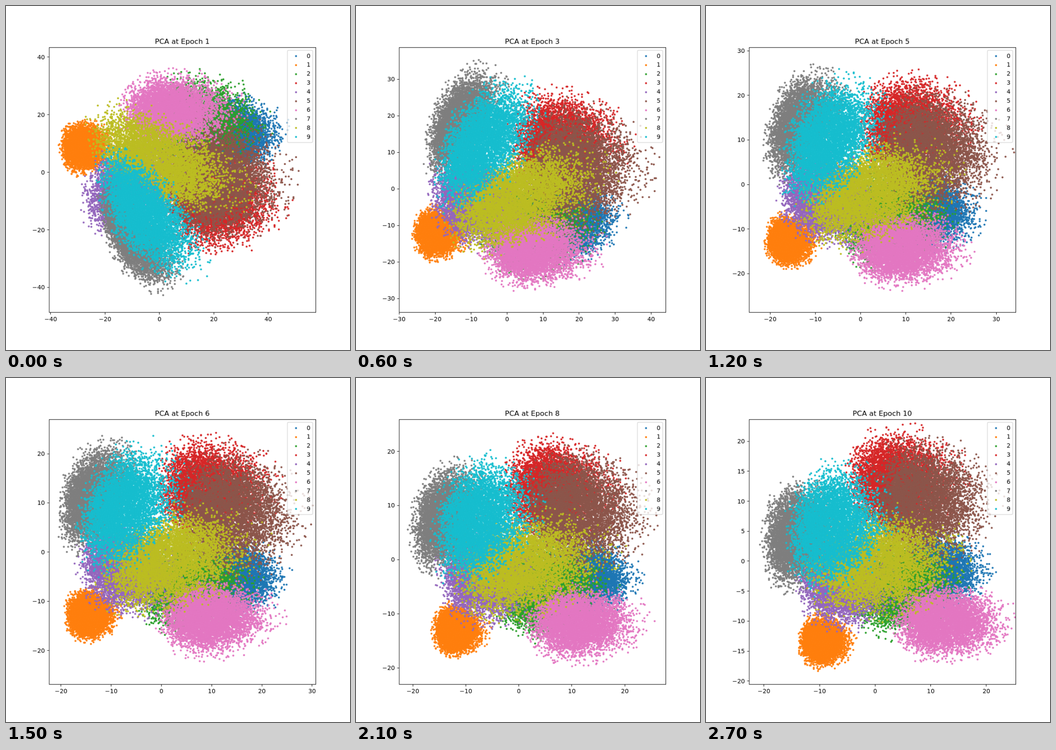
These frames come from a looping animation (748x748 px, 3000 ms). An HTML page with a canvas:

```html
<!DOCTYPE html>
<html lang="en">
<head>
<meta charset="utf-8">
<title>PCA by epoch</title>
<style>
  html, body { margin: 0; width: 100%; height: 100%; overflow: hidden; background: #fff; }
  canvas { display: block; width: 100%; height: 100%; }
</style>
</head>
<body>
<canvas id="plot" width="800" height="800"></canvas>
<script>
const SIZE = 800, UNIT = 748 / SIZE;      // canvas size, stage pixels per canvas pixel
const LEFT = 100, RIGHT = 720, TOP = 96, BOTTOM = 712;
const FONT = '"DejaVu Sans", sans-serif';
const POINTS = 6000, SKEW = 0.06, LAST = 10;

// Stage position of the data origin and pixels per data unit
const axes = [
  { epoch: 1, x: 333.6, y: 361.5, kx: 5.913, ky: 6.26 },
  { epoch: 2, x: 323, y: 397.4, kx: 6.9, ky: 7.21 },
  { epoch: 4, x: 334.2, y: 397.5, kx: 8.75, ky: 8.683 },
  { epoch: 6, x: 338, y: 378.6, kx: 10.92, ky: 10.7 },
  { epoch: 7, x: 354.8, y: 391, kx: 11.14, ky: 11.925 },
  { epoch: 9, x: 353.3, y: 399, kx: 11.91, ky: 11.63 },
  { epoch: 10, x: 367.8, y: 398.3, kx: 12.09, ky: 13.04 }
];

// first, flipped, last: centres in data units at epochs 1, 2 and 10;
// spread in stage pixels; tilt is the correlation after the flip
const clusters = [
  { color: '#1f77b4', first: [26.5, 13], flipped: [19, -10.5], last: [11, -1.7], spread: [36, 31], tilt: 0 },
  { color: '#ff7f0e', first: [-28, 8.7], flipped: [-22.6, -11.7], last: [-9.5, -13.3], spread: [21, 21], tilt: 0 },
  { color: '#2ca02c', first: [13.8, 17], flipped: [7.5, -11.5], last: [3.9, -4.3], spread: [46, 38], tilt: 0 },
  { color: '#d62728', first: [20.5, -9.3], flipped: [17.7, 12.4], last: [3.9, 13.3], spread: [46, 42], tilt: 0 },
  { color: '#9467bd', first: [-10.8, -4.6], flipped: [-9.9, -3.1], last: [-6, -3.2], spread: [42, 38], tilt: -0.3 },
  { color: '#8c564b', first: [20.5, -2.2], flipped: [21.3, 4.5], last: [8.5, 9.8], spread: [52, 50], tilt: 0 },
  { color: '#e377c2', first: [4.5, 21.3], flipped: [5.4, -18.4], last: [12.2, -10], spread: [46, 31], tilt: 0 },
  { color: '#7f7f7f', first: [-9.9, -22], flipped: [-12.8, 22.9], last: [-14.2, 4.5], spread: [31, 43], tilt: 0.65 },
  { color: '#bcbd22', first: [-0.6, 4.2], flipped: [3.2, -3.1], last: [0, -0.5], spread: [62, 43], tilt: 0.5 },
  { color: '#17becf', first: [-5.7, -14.1], flipped: [-7, 14.2], last: [-7.8, 5.9], spread: [41, 50], tilt: 0.6 }
];

const mix = (a, b, t) => a + (b - a) * t;

function axisAt(epoch) {
  const i = Math.max(1, axes.findIndex(a => a.epoch >= epoch));
  const a = axes[i - 1], b = axes[i];
  const t = (epoch - a.epoch) / (b.epoch - a.epoch);
  return { x: mix(a.x, b.x, t), y: mix(a.y, b.y, t), kx: mix(a.kx, b.kx, t), ky: mix(a.ky, b.ky, t) };
}

// The projection flips after the first epoch, then eases to its last pose
function poseAt(cluster, epoch) {
  if (epoch === 1) return { center: cluster.first, tilt: -cluster.tilt };
  const t = ((epoch - 2) / (LAST - 2)) ** 0.7;
  return {
    center: cluster.flipped.map((from, k) => mix(from, cluster.last[k], t)),
    tilt: cluster.tilt * (1 - 0.75 * t)
  };
}

function seeded(seed) {
  return () => {
    seed = (seed + 0x6D2B79F5) | 0;
    let h = Math.imul(seed ^ (seed >>> 15), 1 | seed);
    h = (h + Math.imul(h ^ (h >>> 7), 61 | h)) ^ h;
    return ((h ^ (h >>> 14)) >>> 0) / 4294967296;
  };
}

function newCanvas(size) {
  const canvas = document.createElement('canvas');
  canvas.width = canvas.height = size;
  return canvas;
}

const dots = clusters.map(({ color }) => {
  const dot = newCanvas(7), g = dot.getContext('2d');
  g.fillStyle = color;
  g.arc(3.5, 3.5, 2.3, 0, 7);
  g.fill();
  return dot;
});

function drawDot(g, digit, x, y) {
  g.drawImage(dots[digit], Math.round(x) - 3, Math.round(y) - 3);
}

function drawCluster(g, digit, epoch, axis) {
  const random = seeded(digit * 977 + epoch * 31);
  const cluster = clusters[digit], [sx, sy] = cluster.spread;
  const { center, tilt } = poseAt(cluster, epoch);
  const cx = axis.x + center[0] * axis.kx, cy = axis.y - center[1] * axis.ky;
  const rest = Math.sqrt(1 - tilt * tilt);
  for (let i = 0; i < POINTS; i++) {
    // slightly lighter tails than a normal distribution
    const r = 1.1 * (-2 * Math.log(mix(0.003, 1, random()))) ** 0.43;
    const a = random() * 2 * Math.PI;
    const u = r * Math.cos(a), v = r * Math.sin(a);
    const x = cx + sx * (u + SKEW * (u * u - 1));
    const y = cy - sy * (tilt * u + rest * v);
    drawDot(g, digit, x / UNIT, y / UNIT);
  }
}

function text(g, str, x, y, size, align) {
  g.font = `${size}px ${FONT}`;
  g.textAlign = align;
  g.fillText(str, x, y);
}

// Calls draw(position, label) for each tick between two values
function eachTick(min, max, toPixel, draw) {
  const range = max - min, step = range < 45 ? 5 : range < 90 ? 10 : 20;
  for (let v = Math.ceil(min / step) * step; v <= max; v += step)
    draw(toPixel(v) / UNIT, (v < 0 ? '\u2212' : '') + Math.abs(v));
}

function drawAxes(g, epoch, { x: x0, y: y0, kx, ky }) {
  g.fillStyle = g.strokeStyle = '#000';
  g.lineWidth = 1.11;
  g.strokeRect(LEFT + 0.5, TOP + 0.5, RIGHT - LEFT, BOTTOM - TOP);
  g.beginPath();
  eachTick((LEFT * UNIT - x0) / kx, (RIGHT * UNIT - x0) / kx, v => x0 + v * kx, (x, label) => {
    const px = Math.floor(x) + 0.5;
    g.moveTo(px, BOTTOM + 0.5);
    g.lineTo(px, BOTTOM + 5.4);
    text(g, label, x, 733, 13.89, 'center');
  });
  eachTick((y0 - BOTTOM * UNIT) / ky, (y0 - TOP * UNIT) / ky, v => y0 - v * ky, (y, label) => {
    const py = Math.floor(y) + 0.5;
    g.moveTo(LEFT + 0.5, py);
    g.lineTo(LEFT - 4.4, py);
    text(g, label, 90.3, Math.round(y + 5), 13.89, 'right');
  });
  g.stroke();
  text(g, `PCA at Epoch ${epoch}`, 410, 88, 16.67, 'center');
}

function drawLegend(g) {
  g.beginPath();
  g.roundRect(654.5, 103, 58.6, 214.5, 2.8);
  g.fillStyle = 'rgba(255,255,255,0.8)';
  g.strokeStyle = 'rgba(204,204,204,0.8)';
  g.lineWidth = 1.39;
  g.fill();
  g.stroke();
  g.fillStyle = '#000';
  for (let digit = 0; digit < clusters.length; digit++) {
    const y = 115.7 + digit * 20.97;
    drawDot(g, digit, 674, y);
    text(g, digit, 699.2, Math.round(y + 4.8), 13.89, 'left');
  }
}

function render(epoch) {
  const page = newCanvas(SIZE), g = page.getContext('2d');
  const axis = axisAt(epoch);
  g.fillStyle = '#fff';
  g.fillRect(0, 0, SIZE, SIZE);
  g.save();
  g.beginPath();
  g.rect(LEFT, TOP, RIGHT - LEFT, BOTTOM - TOP);
  g.clip();
  for (let digit = 0; digit < clusters.length; digit++) drawCluster(g, digit, epoch, axis);
  g.restore();
  drawAxes(g, epoch, axis);
  drawLegend(g);
  return page;
}

const stage = document.getElementById('plot').getContext('2d');
const pages = [];
let shown = 0;

function frame() {
  const epoch = Math.floor(performance.now() % 3000 / 300) + 1;
  if (epoch !== shown) {
    pages[epoch] ||= render(epoch);
    stage.drawImage(pages[epoch], 0, 0);
    shown = epoch;
  }
  requestAnimationFrame(frame);
}
frame();
</script>
</body>
</html>
```
